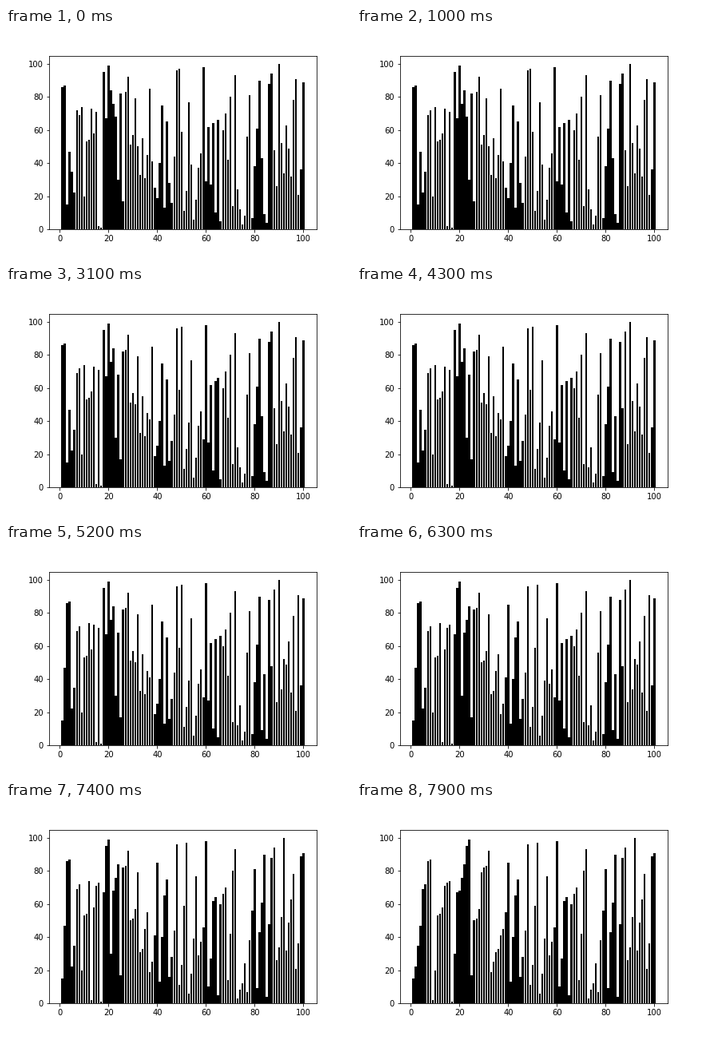
A matplotlib script for the animation above (8000 ms loop, 432 by 288 pixels).

```python
"""Bottom-up merge sort of 100 bars: every frame sorts one more block."""
import matplotlib.pyplot as plt
from matplotlib.animation import FuncAnimation

INTERVAL = 100  # ms per merge
FRAMES = 80

START = [
    86, 87, 15, 47, 35, 22, 72, 69, 74, 20, 53, 54, 73, 58, 71, 2, 1, 95, 67, 99,
    84, 76, 68, 30, 82, 17, 83, 92, 51, 57, 79, 50, 33, 55, 31, 45, 85, 41, 25, 19,
    40, 75, 13, 65, 28, 16, 44, 96, 97, 59, 11, 23, 77, 39, 6, 18, 37, 46, 98, 29,
    62, 27, 64, 10, 66, 5, 60, 70, 42, 80, 14, 93, 24, 12, 3, 8, 56, 81, 7, 38,
    61, 90, 43, 9, 4, 88, 94, 48, 26, 100, 52, 34, 63, 49, 32, 78, 91, 21, 36, 89,
]


def merge_steps(values):
    """Yield the list after each merge, doubling the block size every pass."""
    values = list(values)
    size = 2
    while size < 2 * len(values):
        for lo in range(0, len(values), size):
            values[lo:lo + size] = sorted(values[lo:lo + size])
            yield list(values)
        size *= 2


states = [state for _, state in zip(range(FRAMES), merge_steps(START))]

fig, ax = plt.subplots(figsize=(6, 4), dpi=72)
fig.subplots_adjust(left=0.125, right=0.9, bottom=0.125, top=0.88)
bars = ax.bar(range(1, len(START) + 1), START, color="black")


def update(frame):
    for bar, height in zip(bars, states[frame]):
        bar.set_height(height)
    return bars.patches


anim = FuncAnimation(fig, update, frames=FRAMES, interval=INTERVAL, repeat=True)

plt.show()
```
